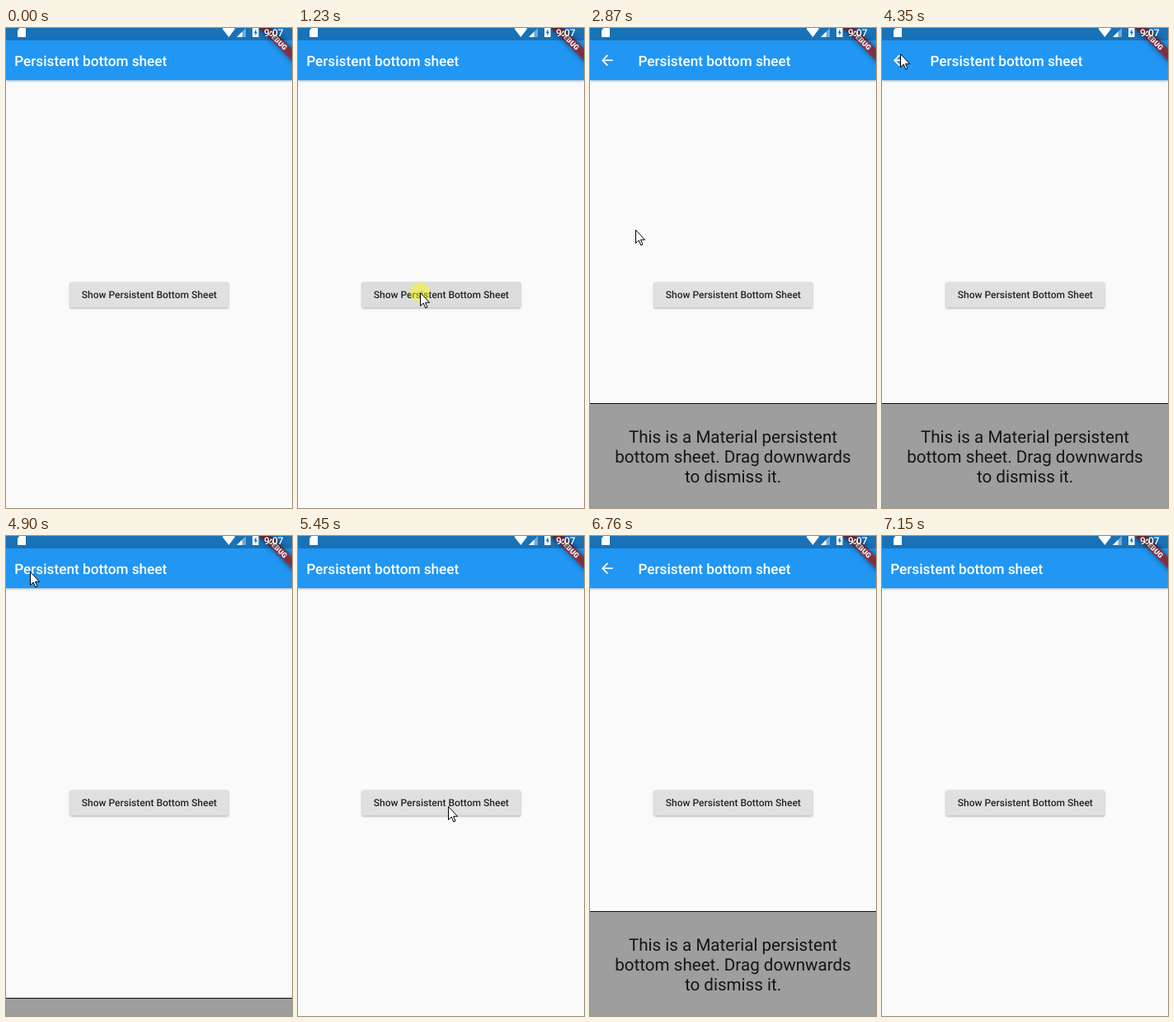
An HTML page for the animation above (8.23 s loop, 347 by 581 pixels).

```html
<!DOCTYPE html>
<html lang="en">
<head>
<meta charset="utf-8">
<title>Persistent bottom sheet</title>
<style>
  html, body { margin: 0; width: 100%; height: 100%; overflow: hidden; background: #fafafa; }
  svg { display: block; font-family: Roboto, sans-serif; text-rendering: geometricPrecision; }
  .medium { font-weight: 500; }
  #bar { filter: drop-shadow(0 1.5px 1.5px rgba(0, 0, 0, .25)); }
  #button { filter: drop-shadow(0 1px 1px rgba(0, 0, 0, .3)); }
</style>
</head>
<body>
<svg width="347" height="581" viewBox="0 0 347 581">
  <clipPath id="buttonClip"><rect x="77.5" y="307.5" width="192.7" height="31" rx="1.7"/></clipPath>
  <rect width="347" height="581" fill="#fafafa"/>

  <rect id="button" x="77.5" y="307.5" width="192.7" height="31" rx="1.7" fill="#e0e0e0"/>
  <g id="ink" clip-path="url(#buttonClip)">
    <rect x="77" y="307" width="194" height="32" fill="#bcbcbc" opacity=".4"/>
    <circle id="splash" fill="#c8c8c8" opacity=".4"/>
  </g>
  <text class="medium" x="173.8" y="327.2" font-size="12.04" text-anchor="middle" fill="#262626">Show Persistent Bottom Sheet</text>

  <g id="sheet">
    <rect width="347" height="130" fill="#9e9e9e"/>
    <rect width="347" height="1" fill="#111"/>
    <g font-size="20.6" text-anchor="middle" fill="#151515">
      <text x="173.5" y="48">This is a Material persistent</text>
      <text x="173.5" y="72">bottom sheet. Drag downwards</text>
      <text x="173.5" y="96">to dismiss it.</text>
    </g>
  </g>

  <rect id="bar" y="-10" width="347" height="73.2" fill="#2196f3"/>
  <path id="back" transform="translate(10.5 28.9) scale(.86)" fill="#fff"
    d="M20 11H7.83l5.59-5.59L12 4l-8 8 8 8 1.41-1.41L7.83 13H20v-2z"/>
  <text id="title" class="medium" y="46" font-size="17.2" fill="#fff">Persistent bottom sheet</text>

  <g transform="translate(350.4 -5.6) rotate(45)">
    <rect x="-34.4" y="24.1" width="68.8" height="10.3" opacity=".5" style="filter:blur(3.4px)"/>
    <rect x="-34.4" y="24.1" width="68.8" height="10.3" fill="#b71c1c" fill-opacity=".627"/>
    <text y="32.4" font-size="8.8" font-weight="900" text-anchor="middle" fill="#fff">DEBUG</text>
  </g>

  <rect width="347" height="15" opacity=".25"/>
  <g fill="#fff">
    <path d="M17 -1H24V11H14V3Z"/>
    <path d="M262.5 1Q270.3 -6 278 1L270.3 11Z"/>
    <path d="M280 11L291 0V11Z" opacity=".4"/>
    <path d="M280 11L286.5 4.5V11Z"/>
    <path d="M299 -1H306.5V11H299Z"/>
    <path d="M303.4 1L300.8 6H302.4V9.5L305 4.7H303.4Z" fill="#1971b6"/>
    <text class="medium" x="313" y="10" font-size="12.04">9:07</text>
  </g>

  <g id="pointer">
    <circle id="click" r="12" fill="#ff0" opacity=".47"/>
    <path d="M.5 .5V16.5L4.2 13L6.8 19L9 18L6.5 12.3H11.5Z" fill="#fff" stroke="#000"/>
  </g>
</svg>
<script>
const LOOP = 8230, TICK = 77.95, FIRST_TICK = 676;
const SHEET_HEIGHT = 127, SLIDE = 200, INK_FADE = 215;

const entry = { x: 140, y: 476, shown: 676, hidden: 6750 };
const moves = [
  { from: 676, to: 980, x: 148, y: 320 },
  { from: 1950, to: 2480, x: 154, y: 424 },
  { from: 2480, to: 2780, x: 145, y: 387 },
  { from: 2790, to: 2850, x: 55, y: 244 },
  { from: 2870, to: 3010, x: 63, y: 211 },
  { from: 3510, to: 4110, x: 3, y: 58 },
  { from: 4110, to: 4330, x: 22, y: 31 },
  { from: 4810, to: 5420, x: 182, y: 327 },
  { from: 6230, to: 6670, x: 270, y: 508 }
];
const clicks = [
  { down: 1220, up: 1370 },
  { down: 3170, up: 3245 },
  { down: 3325, up: 3400 },
  { down: 4570, up: 4720 },
  { down: 5660, up: 5810 }
];
const visits = [
  { press: 1220, open: 1445, close: 4720 },
  { press: 5660, open: 5838, close: 6900 }
];

const $ = id => document.getElementById(id);
const clamp = v => Math.max(0, Math.min(1, v));
const ramp = (t, from, to) => clamp((t - from) / (to - from));
const smooth = k => k * k * (3 - 2 * k);
const within = (t, from, to) => t >= from && t < to;
const set = (el, attrs) => Object.entries(attrs).forEach(([name, v]) => el.setAttribute(name, v));
const show = (el, on) => { el.style.display = on ? '' : 'none'; };

function pointerAt(t) {
  return moves.reduce((at, { from, to, x, y }) => {
    const k = smooth(ramp(t, from, to));
    return { x: at.x + (x - at.x) * k, y: at.y + (y - at.y) * k };
  }, entry);
}

function drawInk(t, { press, open }, { x, y }) {
  const glow = ramp(t, press - 40, press + 160) * (1 - ramp(t, open, open + INK_FADE));
  const r = 15 + 45 * ramp(t, press, open) + 130 * ramp(t, open, open + 150);
  set($('ink'), { opacity: glow });
  set($('splash'), { cx: x, cy: y, r });
}

function draw(t) {
  const visit = visits.findLast(v => t >= v.press) || visits[0];
  const { open, close } = visit;
  const rise = ramp(t, open, open + SLIDE) - ramp(t, close, close + SLIDE);
  const isOpen = within(t, open, close);
  const pointer = pointerAt(t);

  set($('sheet'), { transform: `translate(0 ${Math.round(581 - SHEET_HEIGHT * rise)})` });
  show($('sheet'), rise > 0);
  show($('back'), isOpen);
  set($('title'), { x: isOpen ? 58.4 : 10.2 });
  drawInk(t, visit, pointer);

  set($('pointer'), { transform: `translate(${Math.round(pointer.x)} ${Math.round(pointer.y)})` });
  show($('pointer'), within(t, entry.shown, entry.hidden));
  show($('click'), clicks.some(c => within(t, c.down, c.up)));
}

function frame() {
  const t = performance.now() % LOOP;
  // The screen refreshes on a steady tick
  draw(FIRST_TICK + Math.floor((t - FIRST_TICK) / TICK) * TICK);
  requestAnimationFrame(frame);
}
frame();
</script>
</body>
</html>
```
